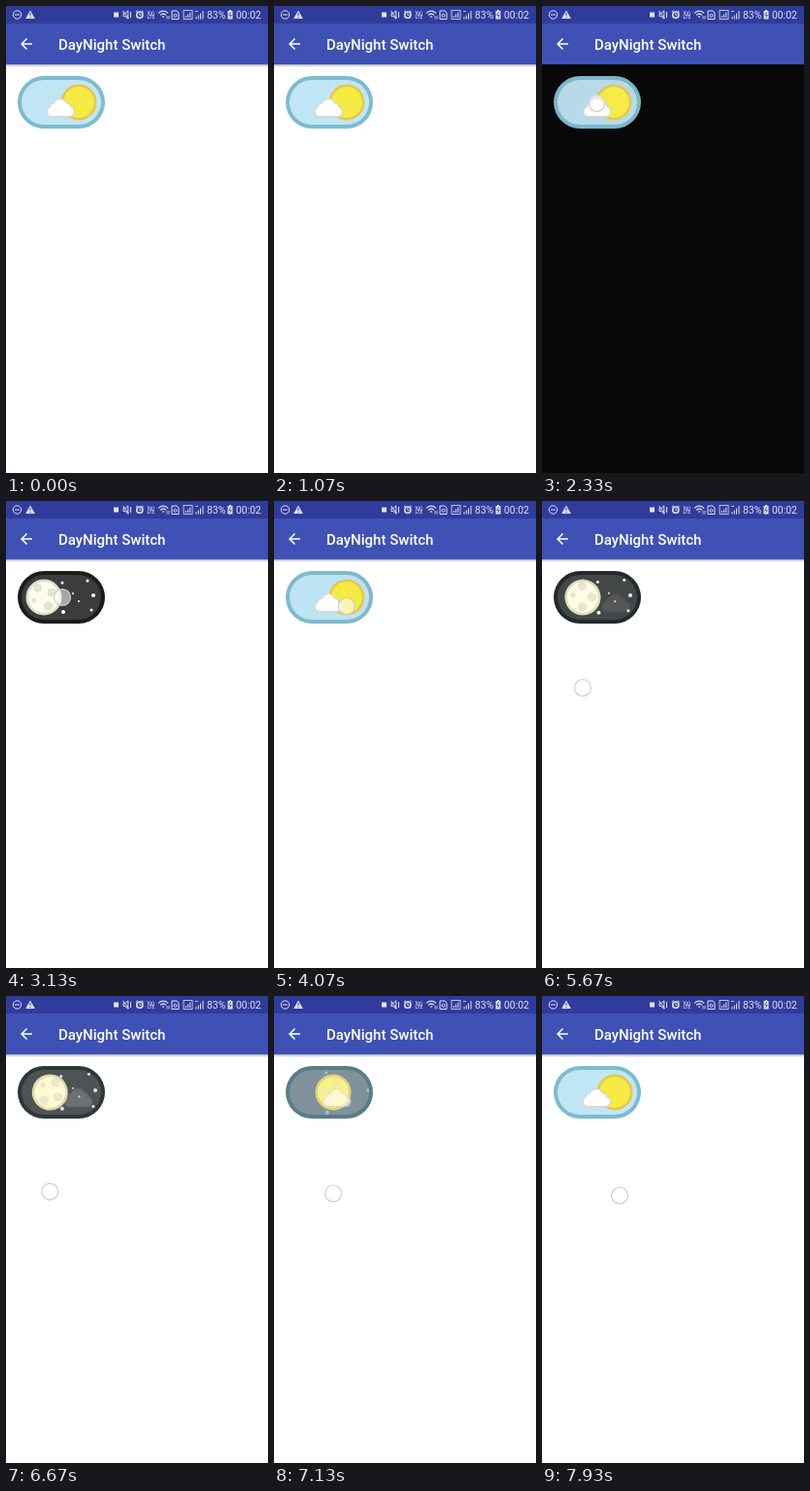
An HTML page that plays this animation: 270x480 px, repeating every 8000 ms.

```html
<!DOCTYPE html>
<html lang="en">
<head>
<meta charset="utf-8">
<title>DayNight Switch</title>
<style>
  html, body { margin: 0; width: 100%; height: 100%; overflow: hidden; background: #fff; }
  svg { display: block; width: 100%; height: 100%; }
  text { font-family: Roboto, "Open Sans", sans-serif; fill: #fff; }
</style>
</head>
<body>
<svg viewBox="0 0 270 480">
  <defs>
    <linearGradient id="shade" x1="0" y1="0" x2="0" y2="1">
      <stop offset="0" stop-color="#000" stop-opacity=".3"/>
      <stop offset="1" stop-color="#000" stop-opacity="0"/>
    </linearGradient>
    <clipPath id="pill"><rect x="16" y="76" width="82" height="46" rx="23"/></clipPath>
    <g id="puffs">
      <circle cx="-9" cy="4.6" r="4.4"/>
      <circle cx="-6.5" cy="0.6" r="3.8"/>
      <circle cx="0" cy="-1.8" r="6.2"/>
      <circle cx="6.2" cy="0.4" r="4"/>
      <circle cx="9.4" cy="4.6" r="4.4"/>
      <rect x="-9" y="0" width="18.4" height="9"/>
    </g>
  </defs>

  <rect width="270" height="480" fill="#fff"/>
  <rect id="dark" y="60" width="270" height="420" fill="#000"/>
  <rect y="60" width="270" height="3" fill="url(#shade)"/>

  <!-- app bar -->
  <rect width="270" height="18" fill="#303c9c"/>
  <rect y="18" width="270" height="42" fill="#3f51b5"/>
  <path d="M27 38.25H17.87L22.06 34.06 21 33 15 39 21 45 22.06 43.94 17.87 39.75H27Z" fill="#fff"/>
  <text x="54" y="45" font-size="15" font-weight="500">DayNight Switch</text>

  <!-- status bar -->
  <g opacity=".85">
    <g fill="none" stroke="#fff">
      <path d="M9 9h5"/>
      <circle cx="11.5" cy="9" r="4.2"/>
      <path d="M121 7.5h1.8l3-2.6v8.2l-3-2.6H121zM120.5 5l6 8M128.5 6v6"/>
      <circle cx="137.8" cy="9.2" r="3.1" stroke-width="1.5"/>
      <path d="M137.8 7.4v2h1.6M133.9 6.2l1.8-1.6M141.7 6.2l-1.8-1.6"/>
      <path d="M157 7.4q5-4.6 10 0M159 9.4q3-2.8 6 0M161 11.4q1-1 2 0" stroke-width="1.2"/>
      <path d="M171 5h5l2 2v6.5h-7z"/>
      <circle cx="174.5" cy="9.8" r="1.5"/>
      <rect x="183" y="4.5" width="9" height="9" stroke-width=".8"/>
      <path d="M185.3 12v-2M187.5 12V8.5M189.7 12V6.5M196 13.5V11M198.3 13.5V9.5M200.5 13.5V7.5M203 13.5V5"/>
      <path d="M195 5.5h3M166 10v3.5M168 10v3.5" stroke-width=".8"/>
    </g>
    <path d="M25 4.4 29.8 13H20.2Z" fill="#fff"/>
    <path d="M25 7v3M25 11v1.1" stroke="#303c9c"/>
    <rect x="111" y="6.5" width="5" height="5" fill="#fff"/>
    <text x="149.3" y="8.8" font-size="4.8" font-weight="500" text-anchor="middle">Vo)</text>
    <text x="149.3" y="13.4" font-size="4.8" font-weight="500" text-anchor="middle">LTE</text>
    <path d="M230 4h2v1h1.5v8.5h-5V5H230z" fill="#fff"/>
    <path d="M231.6 6.3 229.8 9.4H232.2L230.5 12" fill="none" stroke="#303c9c" stroke-width=".8"/>
    <text x="207" y="12.8" font-size="10.4">83%</text>
    <text x="237" y="12.8" font-size="10.4">00:02</text>
  </g>

  <!-- switch -->
  <rect id="rim" x="12" y="72" width="90" height="54" rx="27"/>
  <rect id="sky" x="16" y="76" width="82" height="46" rx="23"/>
  <g id="stars" clip-path="url(#pill)" fill="#fff"></g>
  <g id="knob">
    <circle id="disc" r="17.2" stroke-width="2.6"/>
    <g id="craters" fill="#e6e7cf" stroke="#dee1c5">
      <circle cx="-6.4" cy="-9.6" r="3.8"/>
      <circle cx="8" cy="-5" r="4"/>
      <circle cx="4.5" cy="9" r="4"/>
      <circle cx="-10" cy="3" r="2"/>
    </g>
  </g>
  <g id="cloud">
    <use href="#puffs" fill="#d8d4d4" stroke="#d8d4d4" stroke-width="2.6" stroke-linejoin="round"/>
    <use href="#puffs" fill="#fff"/>
  </g>
  <circle id="touch" r="8.5" fill="#fff" fill-opacity=".55" stroke="#cdcbdc" stroke-width="1.2"/>
</svg>

<script>
const LOOP = 8000, TAP_MS = 600;
const TAP_NIGHT = 2265, TAP_DAY = 3200, DRAG = 3965;
const DAY_X = 75, TRAVEL = 36, MID_Y = 99;

// finger path while dragging: time, x, y
const path = [
  [3965, 76, 103], [4330, 72, 121], [4730, 64, 147], [5150, 53, 170],
  [5670, 42, 192], [6000, 37, 200], [6430, 37, 200], [7130, 61, 203],
  [7600, 75, 204.3], [7930, 80, 205], [8000, 80, 205]
];
// resting place and radius
const starSpots = [
  [58, 84, 1.5], [84, 82, 1.5], [69, 95, 1], [90, 97, 2],
  [75, 103, 1], [59, 114, 2], [88, 112, 1.5]
];

const $ = id => document.getElementById(id);
const set = (el, attrs) => { for (const k in attrs) el.setAttribute(k, attrs[k]); };
const clamp = x => Math.min(1, Math.max(0, x));
const lerp = (a, b, k) => a + (b - a) * k;
const ease = k => (1 - Math.cos(Math.PI * clamp(k))) / 2;
const mix = (a, b, k) => `rgb(${a.map((c, i) => Math.round(lerp(c, b[i], k)))})`;

const stars = starSpots.map(([, , r]) => {
  const dot = document.createElementNS("http://www.w3.org/2000/svg", "circle");
  dot.setAttribute("r", r);
  return $("stars").appendChild(dot);
});

function fingerAt(t) {
  let i = 1;
  while (i < path.length - 1 && path[i][0] < t) i++;
  const [t0, x0, y0] = path[i - 1], [t1, x1, y1] = path[i];
  const k = clamp((t - t0) / (t1 - t0));
  return { x: lerp(x0, x1, k), y: lerp(y0, y1, k), alpha: 1 };
}

function touchAt(t) {
  if (t >= DRAG) return fingerAt(t);
  const press = (x, y, from, to) =>
    ({ x, y, alpha: t < from ? 0 : clamp((to - t) / 70) });
  return t < 2700 ? press(56.5, 100, 2250, 2420) : press(58, 99, 3060, 3270);
}

// 0 is day, 1 is night
function nightAt(t, touch) {
  if (t >= DRAG) return clamp((DAY_X - touch.x) / TRAVEL);
  if (t >= TAP_DAY) return 1 - ease((t - TAP_DAY) / TAP_MS);
  return ease((t - TAP_NIGHT) / TAP_MS);
}

const tapping = t => [TAP_NIGHT, TAP_DAY].some(s => t >= s && t < s + TAP_MS);

function draw(t) {
  const touch = touchAt(t), night = nightAt(t, touch), day = 1 - night;

  set($("dark"), { opacity: tapping(t) ? day : 0 });
  set($("rim"), { fill: mix([126, 187, 206], [28, 28, 28], night) });
  set($("sky"), { fill: mix([192, 230, 246], [60, 60, 60], night ** 0.75) });

  const spread = 1 + 0.6 * day;
  set($("stars"), { opacity: night });
  stars.forEach((dot, i) => set(dot, {
    cx: 70 + (starSpots[i][0] - 70) * spread,
    cy: 98 + (starSpots[i][1] - 98) * spread
  }));

  set($("knob"), { transform: `translate(${DAY_X - TRAVEL * night} ${MID_Y}) rotate(${360 * day})` });
  set($("disc"), {
    fill: mix([245, 235, 66], [255, 253, 242], night),
    stroke: mix([228, 199, 77], [222, 225, 197], night)
  });
  set($("craters"), { opacity: night });
  set($("cloud"), { transform: `translate(${56 + 22 * night} 104)`, opacity: day });
  set($("touch"), { cx: touch.x, cy: touch.y, opacity: touch.alpha });
}

const start = performance.now();
function tick() {
  draw((performance.now() - start) % LOOP);
  requestAnimationFrame(tick);
}
tick();
</script>
</body>
</html>
```
